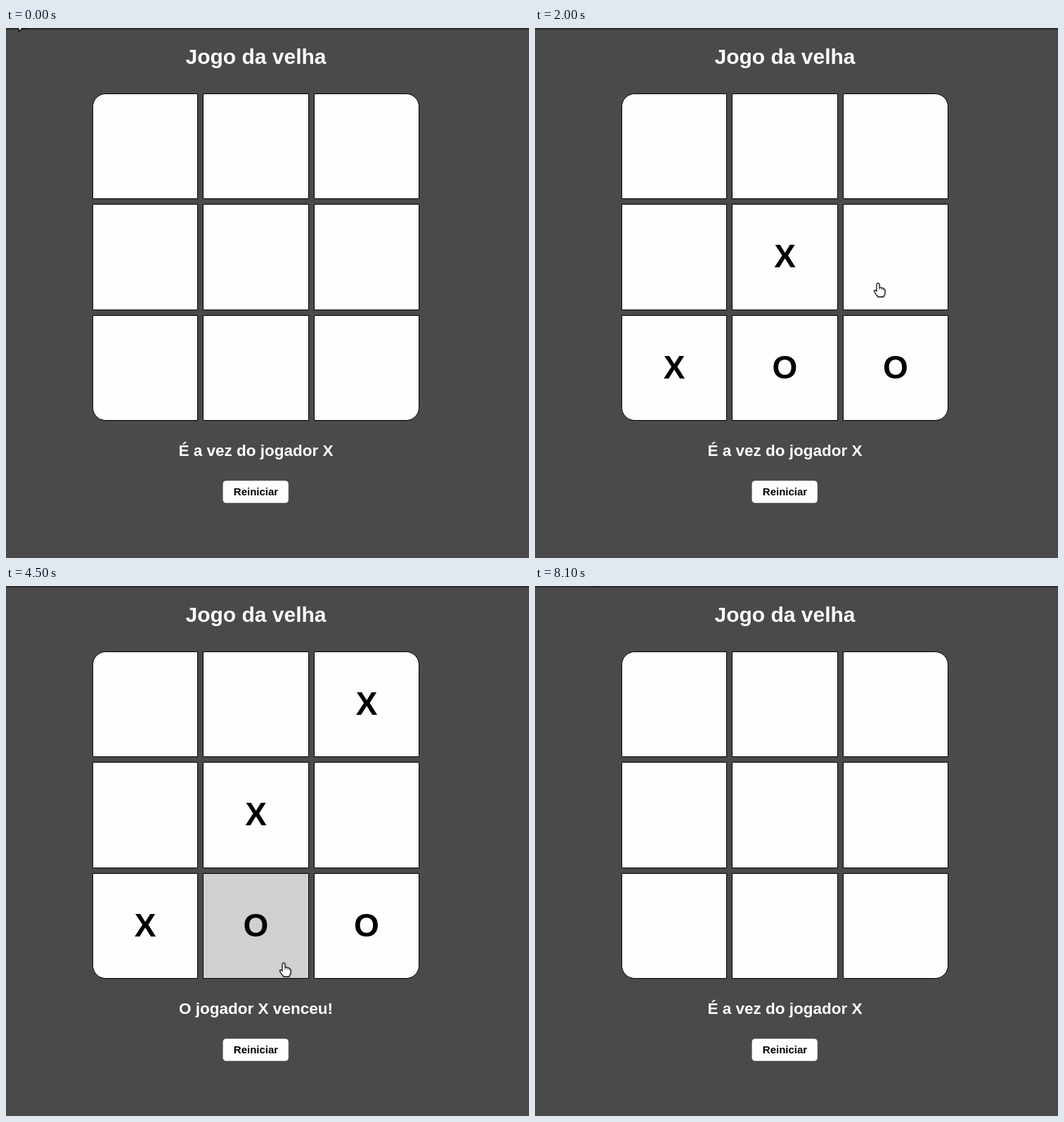
An HTML page with a canvas that plays this animation: 744x753 px, repeating every 8200 ms.

```html
<!DOCTYPE html>
<html lang="pt-BR">
<head>
<meta charset="utf-8">
<title>Jogo da velha</title>
<style>
html, body { margin: 0; width: 100%; height: 100%; overflow: hidden; background: #4a4a4a; }
canvas { display: block; }
</style>
</head>
<body>
<canvas id="stage" width="744" height="753"></canvas>
<script>
const ctx = document.getElementById('stage').getContext('2d', { alpha: false });
const LOOP = 8200, STEP = 100;
const ARIAL = '"Liberation Sans", Arial, sans-serif';
const UI = '"Open Sans", "Noto Sans", sans-serif';
const MID = 355.5;
const DIALOG_ON = 2600, DIALOG_OFF = 4000, RESET = 5600;

// Nine cells on a 157.5 px pitch, edges snapped to whole pixels.
const PITCH = 157.5, SIZE = 150, RADIUS = 18.25;
const span = (start, n) => {
  const a = start + n * PITCH;
  return [Math.floor(a), Math.ceil(a + SIZE)];
};
const CELLS = Array.from({ length: 9 }, (_, i) => {
  const c = i % 3, r = Math.floor(i / 3);
  const [x, right] = span(123, c), [y, bottom] = span(93, r);
  const corner = (col, row) => (c === col && r === row ? RADIUS : 0);
  const radii = [corner(0, 0), corner(2, 0), corner(2, 2), corner(0, 2)];
  return { x, y, w: right - x, h: bottom - y, radii };
});
const BUTTON = { x: 308.6, y: 643.3, w: 93.2, h: 31.5 };
const OK = { x: 485, y: 82, w: 61, h: 36 };
const RING = { x: 482, y: 78, w: 67, h: 43 };
const STATUS = { x: 245, y: 586, w: 221, h: 28 };
const TARGETS = [...CELLS, BUTTON];

// Cells in the order played, X first.
const MOVES = [
  { t: 900, cell: 6 }, { t: 1200, cell: 7 }, { t: 1400, cell: 4 },
  { t: 1700, cell: 8 }, { t: DIALOG_OFF, cell: 2 }
];

// Where the pointer comes to rest: time, x, y.
const STOPS = [
  [0, 18, -12], [900, 200, 480], [1100, 341, 480], [1400, 352, 345], [1600, 489, 425],
  [1900, 489, 404], [2000, 488, 362], [2100, 488, 362], [2500, 487, 220], [2600, 487, 220],
  [3200, 612, 300], [3800, 516, 104], [4100, 516, 104], [4900, 378, 596], [5000, 367, 678],
  [5200, 366, 681], [5300, 362, 656], [5900, 362, 664], [6200, 200, 575], [6800, 14, -10],
  [7000, 14, -11], [7100, 222, 245], [7200, 222, 245], [7300, 64, -13], [LOOP, 84, -16]
];

const HAND = new Path2D('M-2 2Q0-1 2 2V7Q6 6.2 9.2 9Q10.6 10.5 10 14Q9.5 18 7.5 20H0Q-3 17-5.6 12Q-5.4 9-2 12Z');
const KNUCKLES = new Path2D('M2 7V10M5 7.5V10.5M7.7 8.5V11');
const ARROW = new Path2D('M0 0V17L5 12.3H12Z');
const IBEAM = new Path2D('M-3.5-8H-1L0-7L1-8H3.5M0-7V7M-3.5 8H-1L0 7L1 8H3.5');

const inside = (p, b) => p.x >= b.x && p.x < b.x + b.w && p.y >= b.y && p.y < b.y + b.h;
const dialogOpen = t => t >= DIALOG_ON && t < DIALOG_OFF;
const easeOut = f => 1 - (1 - f) ** 3;

function pointerAt(t) {
  const i = STOPS.findIndex(s => s[0] > t);
  const [t0, x0, y0] = STOPS[i - 1], [t1, x1, y1] = STOPS[i];
  const f = easeOut((t - t0) / (t1 - t0));
  return { x: x0 + (x1 - x0) * f, y: y0 + (y1 - y0) * f };
}

// Hover level of every target per tick; an open dialog freezes them.
function buildFades() {
  const fades = [TARGETS.map(() => 0)];
  for (let t = STEP; t < LOOP; t += STEP) {
    const prev = fades[fades.length - 1];
    const p = pointerAt(t - STEP);
    const frozen = t > DIALOG_ON && t <= DIALOG_OFF;
    fades.push(frozen ? prev : prev.map((v, i) => v + (inside(p, TARGETS[i]) - v) * 0.9));
  }
  return fades;
}
const FADES = buildFades();

function shade(level) {
  const v = Math.round(254 - 51 * level);
  return `rgb(${v},${v},${v})`;
}

function text(s, x, y, font, color, align = 'center') {
  ctx.font = font;
  ctx.fillStyle = color;
  ctx.textAlign = align;
  ctx.fillText(s, x, y);
}

function box(b, radius, fill, stroke, inset = 0) {
  ctx.beginPath();
  ctx.roundRect(b.x + inset, b.y + inset, b.w - 2 * inset, b.h - 2 * inset, radius);
  if (fill) { ctx.fillStyle = fill; ctx.fill(); }
  if (stroke) { ctx.strokeStyle = stroke; ctx.stroke(); }
}

// Marks on the board at time t.
const playedAt = t => (t >= RESET ? [] : MOVES.filter(m => t >= m.t));
const mark = n => 'XO'[n % 2];

function drawBoard(t, fade) {
  ctx.lineWidth = 1;
  CELLS.forEach((c, i) => box(c, c.radii, shade(fade[i]), '#000', 0.5));
  playedAt(t).forEach((m, n) => {
    const c = CELLS[m.cell];
    text(mark(n), c.x + c.w / 2, Math.floor(c.y + c.h / 2 + 15), `bold 46px ${ARIAL}`, '#000');
  });
}

function statusAt(t) {
  const n = playedAt(t).length;
  return n === MOVES.length ? 'O jogador X venceu!' : 'É a vez do jogador ' + mark(n);
}

function drawDialog(p) {
  const panel = { x: 146, y: -1, w: 418, h: 137 };
  ctx.save();
  ctx.shadowColor = 'rgba(0,0,0,.5)';
  ctx.shadowBlur = 4;
  ctx.shadowOffsetY = 1;
  box(panel, 11, '#1e1e1e');
  ctx.restore();
  ctx.lineWidth = 1;
  box(panel, 10.5, null, '#3c3c3c', 0.5);
  text('zumo384.github.io diz', 166, 35, `600 13.75px ${UI}`, '#f4f4f4', 'left');
  text('O jogador X venceu!', 166, 62, `500 11.6px ${UI}`, '#f0f0f0', 'left');
  ctx.lineWidth = 2;
  box(RING, 20.5, null, '#a8c7fa', 1);
  box(OK, 18, inside(p, OK) ? '#a0bdee' : '#a8c7fa');
  text('OK', 515.5, 104, `600 11.5px ${UI}`, '#0b3470');
}

function drawPointer(t, p) {
  const modal = dialogOpen(t) && t > DIALOG_ON;
  ctx.save();
  ctx.translate(Math.round(p.x), Math.round(p.y));
  if (!modal && inside(p, STATUS)) {
    ctx.translate(0.5, 0);
    ctx.lineWidth = 1;
    ctx.strokeStyle = '#858585';
    ctx.stroke(IBEAM);
  } else {
    const hand = !modal && TARGETS.some(b => inside(p, b));
    const shape = hand ? HAND : ARROW;
    ctx.save();
    ctx.shadowColor = 'rgba(0,0,0,.3)';
    ctx.shadowBlur = 3;
    ctx.shadowOffsetX = ctx.shadowOffsetY = 1;
    ctx.fillStyle = '#fff';
    ctx.fill(shape);
    ctx.restore();
    ctx.lineWidth = 1.3;
    ctx.lineJoin = 'round';
    ctx.strokeStyle = '#111';
    ctx.stroke(shape);
    if (hand) {
      ctx.lineWidth = 0.7;
      ctx.stroke(KNUCKLES);
    }
  }
  ctx.restore();
}

function draw(time) {
  const tick = Math.floor(time / STEP), t = tick * STEP;
  const fade = FADES[tick], p = pointerAt(t);

  ctx.fillStyle = '#4a4a4a';
  ctx.fillRect(0, 0, 744, 753);
  ctx.fillStyle = '#2d2d2d';
  ctx.fillRect(0, 0, 744, 2);
  ctx.fillStyle = '#404040';
  ctx.fillRect(0, 2, 744, 1);

  text('Jogo da velha', MID, 51, `bold 30px ${ARIAL}`, '#fff');
  drawBoard(t, fade);
  text(statusAt(t), MID, 608, `bold 22.5px ${ARIAL}`, '#fff');
  box(BUTTON, 4.5, shade(fade[CELLS.length]));
  text('Reiniciar', MID, 664, `bold 15px ${ARIAL}`, '#000');
  if (dialogOpen(t)) drawDialog(p);
  drawPointer(t, p);
}

const start = performance.now();
function loop() {
  draw((performance.now() - start) % LOOP);
  requestAnimationFrame(loop);
}
loop();
</script>
</body>
</html>
```
